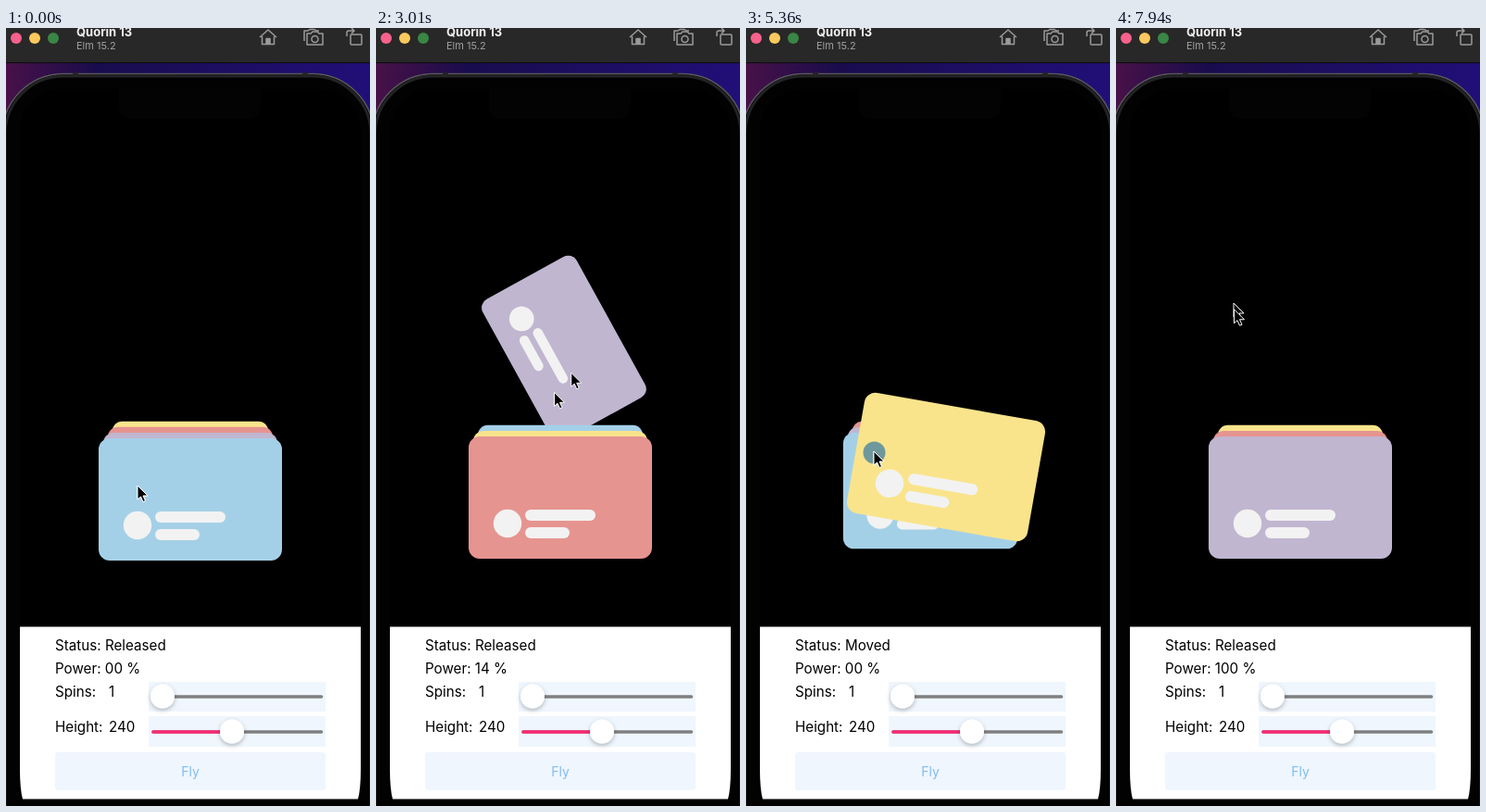
These frames come from a looping animation (393x840 px, 7.99 s). An HTML page:

```html
<!DOCTYPE html>
<html lang="en">
<head>
<meta charset="utf-8">
<title>Flying cards</title>
<style>
  html, body { margin: 0; width: 100%; height: 100%; overflow: hidden; background: #000; }
  svg { display: block; width: 100%; height: 100%; font: 15.2px Inter, Roboto, sans-serif; }
  .icon { fill: none; stroke: #9a9a9a; stroke-width: 1.5; stroke-linejoin: round; }
</style>
</head>
<body>
<svg viewBox="0 0 393 840">
  <defs>
    <linearGradient id="wall">
      <stop offset="0" stop-color="#481148"/>
      <stop offset=".25" stop-color="#190c4c"/>
      <stop offset="1" stop-color="#210f78"/>
    </linearGradient>
    <clipPath id="screen"><rect x="15" y="53" width="368" height="787"/></clipPath>
    <filter id="shadow" x="-50%" y="-50%" width="200%" height="200%">
      <feDropShadow dx="0" dy="2" stdDeviation="2.5" flood-opacity=".28"/>
    </filter>
    <g id="face" fill="#f2f2f2">
      <rect x="-99" y="-66" width="198" height="132" rx="12" fill="currentColor"/>
      <circle cx="-57" cy="28" r="15.2"/>
      <rect x="-38" y="13" width="76" height="12" rx="6"/>
      <rect x="-38" y="32" width="48" height="12" rx="6"/>
    </g>
    <path id="arrow" d="M0 0V15L3.5 12L6 17.5L8.5 16.5L6 11H11Z" fill="#000" stroke="#fff"/>
  </defs>

  <!-- window and phone -->
  <rect y="37" width="393" height="80" fill="url(#wall)"/>
  <rect width="393" height="38" fill="#282828"/>
  <rect y="37" width="393" height="1" fill="#0c0c0c"/>
  <circle cx="11" cy="11" r="6" fill="#f7618b"/>
  <circle cx="31" cy="11" r="6" fill="#fcc95e"/>
  <circle cx="51" cy="11" r="6" fill="#3a8644"/>
  <text x="76" y="9" font-size="13" font-weight="700" fill="#f0f0f0">Quorin 13</text>
  <text x="76" y="23" font-size="11" fill="#a0a0a0">Elm 15.2</text>
  <g class="icon">
    <path d="M274 10L283 2L292 10M276.500 9V17.500H289.500V9"/>
    <path d="M281 17V11.500H285V17Z" fill="#9a9a9a"/>
    <path d="M322 14V3H326L328 1.500H333L335 3H338"/>
    <path d="M325 6H329L331 4H336L338 6H342V18H325Z"/>
    <circle cx="333.500" cy="12" r="3.500"/>
    <rect x="372" y="7" width="12" height="11" rx="1"/>
    <path d="M368 9V5Q368 3 370 3H376M373 0L376 3L373 6"/>
  </g>
  <rect x="-4" y="49.500" width="401" height="900" rx="66" fill="#020203" stroke="#5a5a5e" stroke-width="1.500"/>
  <rect x="-1" y="52" width="395" height="900" rx="63" fill="#020203" stroke="#232325" stroke-width="3"/>
  <path d="M75 48V53M323 48V53" stroke="#242426" stroke-width="6"/>
  <rect x="15" y="66" width="368" height="850" rx="46"/>
  <path d="M122 66V84Q122 98 136 98H261Q275 98 275 84V66Z" fill="#030304"/>

  <!-- controls -->
  <path d="M15 646.500H383V800Q383 822 380 832.500H18Q15 822 15 800Z" fill="#fff"/>
  <g fill="#eff6fe">
    <rect x="154" y="706" width="191" height="32"/>
    <rect x="154" y="743" width="191" height="33"/>
    <rect x="53" y="782" width="292" height="41" rx="3"/>
  </g>
  <g stroke-width="3.600" stroke-linecap="round">
    <path d="M159 722H340.500M159 760H340.500" stroke="#808080"/>
    <path d="M159 760H244" stroke="#fb2a74"/>
  </g>
  <g fill="#fff" filter="url(#shadow)">
    <circle cx="169" cy="721.500" r="13"/>
    <circle cx="244" cy="759.500" r="13"/>
  </g>
  <text id="status" x="53" y="672"></text>
  <text id="power" x="53" y="697"></text>
  <text x="53" y="722">Spins:</text><text x="111" y="722">1</text>
  <text x="53" y="760">Height:</text><text x="111" y="760">240</text>
  <text x="199" y="808" font-size="14" text-anchor="middle" fill="#7fbdf0">Fly</text>

  <g id="deck" clip-path="url(#screen)"></g>
  <circle id="touch" r="12" fill="#216ea6" fill-opacity=".64"/>
  <use id="ghost" href="#arrow"/>
  <use id="cursor" href="#arrow"/>
</svg>

<script>
const LOOP = 7990, RISE = 500, FALL = 380, PROMOTE = 260, TRAIL = 50;
const CX = 199, CY = 509, STEP = 9.4, TILT = 10;
const $ = id => document.getElementById(id);
const clamp = v => Math.max(0, Math.min(1, v));
const mix = (a, b, u) => a + (b - a) * u;
const span = (t, from, to) => clamp((t - from) / (to - from));
const easeOut = u => Math.sin(u * Math.PI / 2);
const easeIn = u => 1 - Math.cos(u * Math.PI / 2);
const easeBoth = u => (1 - Math.cos(u * Math.PI)) / 2;

// The pointer presses at grab, shifts by hold, flicks from go on, and leaves for the next card
const throws = [
  { press: 330, go: 480, release: 800, leave: 1300, grab: [142, 494], hold: [0, 0], flick: [-1, -124], power: 10 },
  { press: 1910, go: 2030, release: 2260, leave: 2740, grab: [243, 451], hold: [0, 0], flick: [13, -131], power: 14 },
  { press: 3290, go: 3530, release: 3860, leave: 3960, grab: [126, 470], hold: [0, 0], flick: [-2, -220], power: 17 },
  { press: 5140, go: 5600, release: 5680, leave: 6100, grab: [121, 492], hold: [17, -35], flick: [-10, -150], power: 12 },
  { press: 6740, go: 7070, release: 7350, leave: 7890, grab: [128, 526], hold: [4, -47], flick: [-5, -182], power: 100 }
];
const lastThrow = t => throws.findLastIndex(th => t >= th.press);

function pointer(t) {
  const i = lastThrow(t);
  if (i < 0) return throws[0].grab;
  const th = throws[i], next = throws[i + 1] || { ...throws[0], press: throws[0].press + LOOP };
  const shift = easeOut(span(t, th.press, th.press + 160));
  const flick = easeOut(span(t, th.go, th.release + 100));
  const travel = easeBoth(span(t, th.leave, next.press));
  return th.grab.map((g, k) => mix(g + th.hold[k] * shift + th.flick[k] * flick, next.grab[k], travel));
}

const cards = ['#a4d0e7', '#c0b6d0', '#e69490', '#f9e48c'].map(color => {
  const el = document.createElementNS('http://www.w3.org/2000/svg', 'use');
  el.setAttribute('href', '#face');
  el.style.color = color;
  return el;
});

const place = (el, x, y, scale = 1, turn = 0) =>
  el.setAttribute('transform', `translate(${x} ${y}) rotate(${turn}) scale(${scale})`);

const stack = (el, rank, lift) =>
  place(el, CX, CY - STEP * rank - lift, 1 - 0.05 * rank);

// Held cards follow the pointer; released ones rise by their power, turn once and drop to the back
function placeThrown(el, th, t) {
  const [px, py] = pointer(Math.min(t, th.release));
  const x = CX + px - th.grab[0], y = CY + py - th.grab[1];
  const top = CY - 106 - 13.4 * th.power;
  const dir = th.grab[0] < CX ? 1 : -1;
  const u = (t - th.release) / RISE;
  const v = (t - th.release - RISE) / FALL;
  if (u < 0) {
    place(el, x, y, 1, dir * TILT * span(t, th.press, th.press + 90));
  } else if (v < 0) {
    place(el, x, mix(y, top, 1 - (1 - u) ** 1.5), mix(1, 0.93, u), dir * mix(TILT, 180, u));
  } else {
    place(el, mix(x, CX, v), mix(top, CY - 3 * STEP, easeIn(v)), mix(0.93, 0.85, v), dir * mix(180, 360, v));
  }
}

function draw(t) {
  const index = lastThrow(t), th = throws[index];
  const land = th && th.release + RISE + FALL;
  const active = t < land;
  const flying = active && t >= th.release;
  const first = active ? index : index + 1;
  const order = cards.map((_, i) => cards[(first + i) % cards.length]);
  const promoted = flying ? span(t, th.release, th.release + PROMOTE) : 0;
  const settling = th && !active ? 1 - span(t, land, land + 80) : 0;

  order.forEach((el, rank) => {
    if (active && rank === 0) placeThrown(el, th, t);
    else stack(el, rank - promoted, 2 * (promoted + settling));
  });
  const falling = flying && t > th.release + RISE;
  if (falling) order.push(order.shift());
  $('deck').replaceChildren(...order.reverse());

  $('status').textContent = 'Status: ' + (active && !flying ? 'Moved' : 'Released');
  $('power').textContent = `Power: ${flying ? th.power : '00'} %`;

  const [x, y] = pointer(t);
  place($('cursor'), x, y);
  place($('ghost'), ...pointer(t - TRAIL));
  place($('touch'), x + 0.5, y + 1.5);
  $('touch').style.display = th && t < th.go + 60 ? '' : 'none';
}

function tick() {
  draw(performance.now() % LOOP);
  requestAnimationFrame(tick);
}
tick();
</script>
</body>
</html>
```
